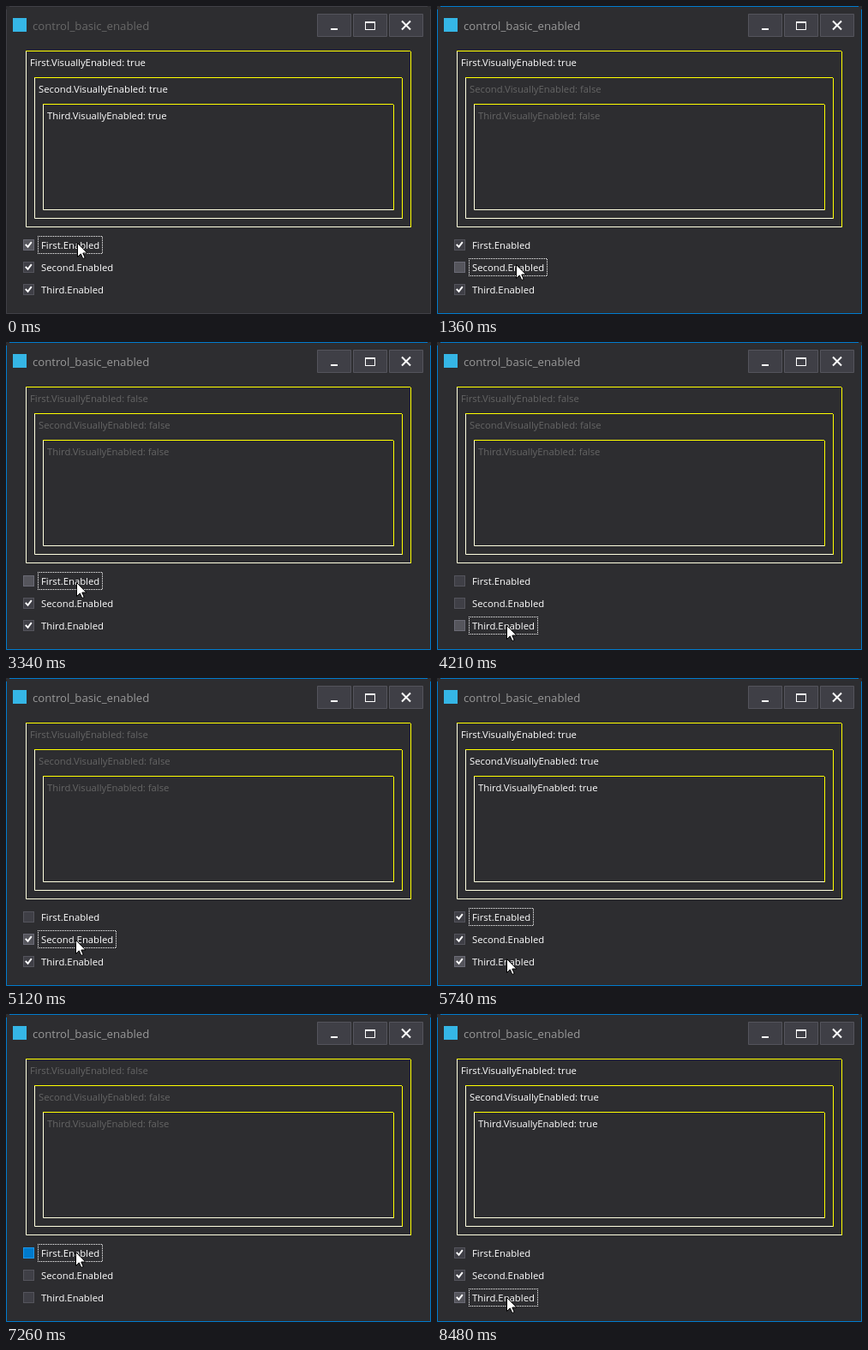
An HTML page that plays this animation: 496x359 px, repeating every 8810 ms.

```html
<!DOCTYPE html>
<html lang="en">
<head>
<meta charset="utf-8">
<title>control_basic_enabled</title>
<style>
  html, body { margin: 0; width: 100%; height: 100%; overflow: hidden; background: #2d2d30; }
  svg { display: block; font: 11.3px "Open Sans", "Noto Sans", sans-serif; fill: none; }
  text { fill: #fff; white-space: pre; }
  #title { font-size: 13.2px; }
  .button { fill: #3f3f46; stroke: #54545c; }
  .glyph { stroke: #fff; stroke-width: 2; }
  .focus { stroke: #fff; stroke-dasharray: 1; stroke-dashoffset: .5; shape-rendering: crispEdges; }
  .yellow { stroke: #ff0; }
  .pale { stroke: #ffffe0; }
</style>
</head>
<body>
<svg width="496" height="359" viewBox="0 0 496 359">
  <path id="frame" d="M4 .5H492M495.5 4V358.5H.5V4"/>
  <rect x="8" y="14" width="16" height="16" fill="#35b6e6"/>
  <text id="title" x="31" y="28">control_basic_enabled</text>
  <path class="button" d="M363.5 9.5h39v26h-39zM405.5 9.5h39v26h-39zM447.5 9.5h39v26h-39z"/>
  <path class="glyph" d="M379 27h8M462 17.5l10 10M472 17.5l-10 10M419 19h12"/>
  <rect x="419.5" y="18.5" width="11" height="9" stroke="#fff"/>
  <g id="content"></g>
  <path id="cursor" fill="#fff" stroke="#000"
    d="M.5 .5V16.5L4.3 12.9L6.8 18.5L9.2 17.5L6.8 12H11.8Z"/>
</svg>
<script>
const LOOP = 8810;
const HOLD = 90;         // how long the button stays down
const TRAVEL = 240;      // longest pointer move
const REACH = 0.9;       // the hand stops a little short of its aim
const NAMES = ['First', 'Second', 'Third'];

// Rows are clicked twice each, then down, up, up and down again.
const ORDER = '001122' + '012' + '210' + '210' + '012';
const PRESSES = [400, 860, 1270, 1600, 2310, 2630, 3250, 3550, 4120,
  4570, 4990, 5340, 5970, 6380, 6860, 7260, 7690, 8390];

const byId = id => document.getElementById(id);
const rowTop = row => 268 + 26 * row;
const visible = on => ({ visibility: on ? 'visible' : 'hidden' });

function set(node, attributes) {
  for (const key in attributes) node.setAttribute(key, attributes[key]);
}

function add(tag, attributes) {
  const node = document.createElementNS('http://www.w3.org/2000/svg', tag);
  set(node, attributes);
  return byId('content').appendChild(node);
}

const rows = NAMES.map((name, i) => {
  const left = 23 + 10 * i, right = 473 - 10 * i;
  const head = 52 + 31 * i, foot = 258 - 10 * i;
  add('path', { class: 'pale', d: `M${left + .5} ${head + 1}V${foot - .5}H${right - 1}` });
  add('path', { class: 'yellow', d: `M${left} ${head + .5}H${right - 1}M${right - .5} ${head + 1}V${foot}` });

  const top = rowTop(i);
  const caption = add('text', { x: 41, y: top + 15 });
  caption.textContent = name + '.Enabled';
  const width = Math.round(caption.getComputedTextLength()) + 7;
  return {
    label: add('text', { x: left + 5, y: head + 18 }),
    box: add('rect', { x: 20.5, y: top + 4.5, width: 12, height: 12 }),
    check: add('path', { class: 'glyph', d: `M22.8 ${top + 9.8}l2.7 3l4.3-5.6` }),
    focus: add('rect', { class: 'focus', x: 37.5, y: top + .5, width, height: 20 })
  };
});

// Each click knows its row and where the pointer rests for it.
const clicks = [];
PRESSES.forEach((press, i) => {
  const row = +ORDER[i], last = clicks[i - 1];
  const click = { row, press, release: press + HOLD, x: 83, y: 276 };
  if (last) {
    const aimX = i < 6 ? 93 : 81, aimY = 274 + 29.5 * row;
    const reach = row === last.row ? 0 : REACH;
    click.x = last.x + (aimX - last.x) * reach;
    click.y = last.y + (aimY - last.y) * reach;
    click.start = last.release + 20;
    click.end = Math.min(click.start + TRAVEL, press - 30);
  }
  clicks.push(click);
});

function pointerAt(t) {
  let { x, y } = clicks[0];
  for (const click of clicks.slice(1)) {
    if (t < click.start) break;
    const p = Math.min(1, (t - click.start) / (click.end - click.start));
    const eased = p * p * (3 - 2 * p);
    x += (click.x - x) * eased;
    y += (click.y - y) * eased;
  }
  return [Math.round(x), Math.round(y)];
}

function render(t) {
  const active = t >= PRESSES[0];
  const checked = [true, true, true];
  let focused = 0, pressed = -1;
  for (const { row, press, release } of clicks) {
    if (t < press) break;
    focused = row;
    if (t < release) pressed = row;
    else checked[row] = !checked[row];
  }

  const [x, y] = pointerAt(t);
  set(byId('cursor'), { transform: `translate(${x} ${y})` });
  set(byId('frame'), { stroke: active ? '#007acc' : '#3f3f46' });
  byId('title').style.fill = active ? '#999' : '#686868';

  let enabled = true;
  rows.forEach((row, i) => {
    enabled = enabled && checked[i];
    row.label.textContent = `${NAMES[i]}.VisuallyEnabled: ${enabled}`;
    row.label.style.fill = enabled ? '#fff' : '#656565';

    const hover = y >= rowTop(i) && y < rowTop(i) + 21;
    const [fill, stroke] = pressed === i ? ['#007acc', '#1c97ea']
      : hover ? ['#55555c', '#6a6a75'] : ['#3f3f46', '#54545c'];
    set(row.box, { fill, stroke });
    set(row.check, visible(checked[i]));
    set(row.focus, visible(focused === i));
  });
}

const startTime = performance.now();
function tick() {
  render((performance.now() - startTime) % LOOP);
  requestAnimationFrame(tick);
}
tick();
</script>
</body>
</html>
```
